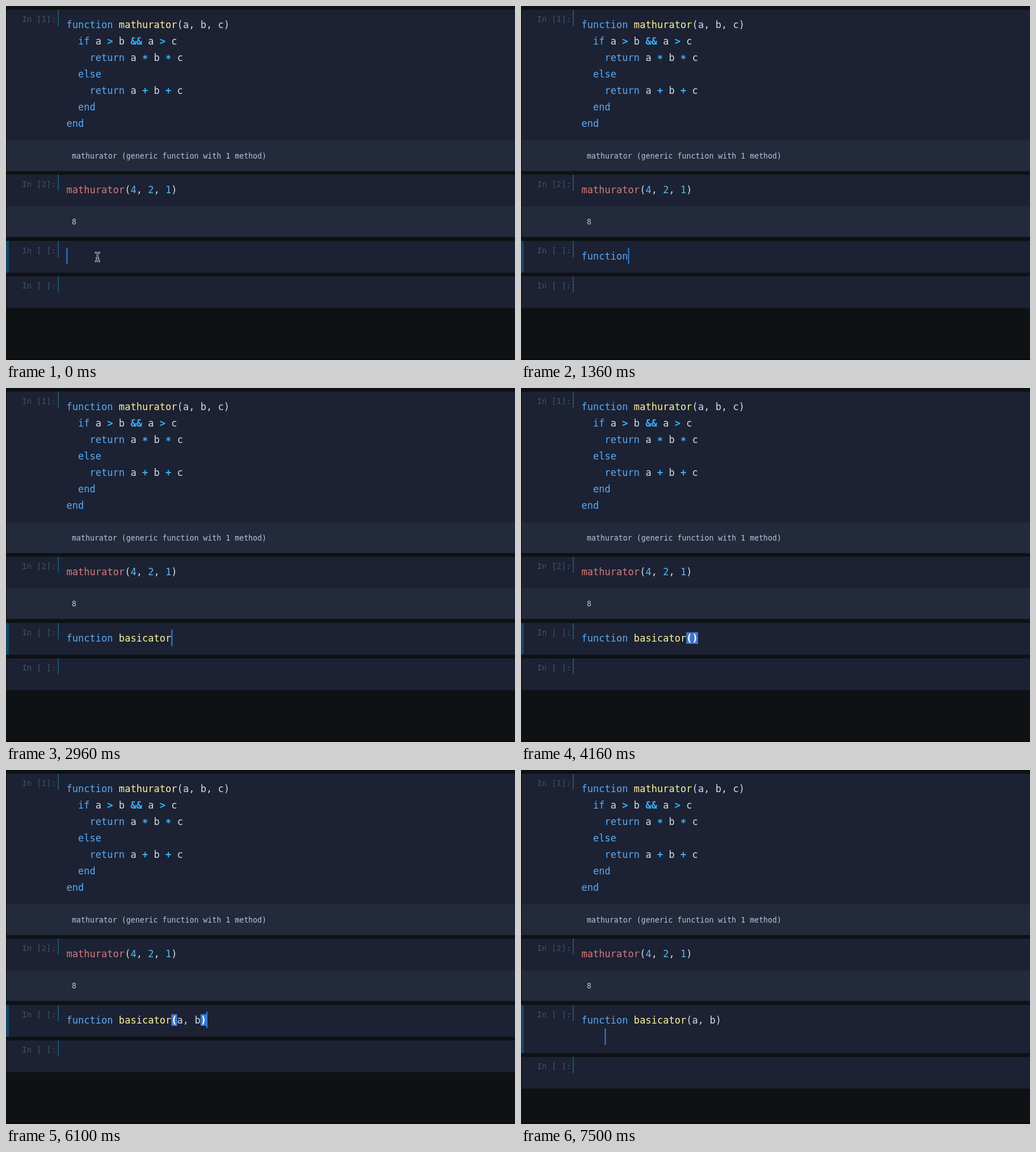
An HTML page for the animation above (8000 ms loop, 897 by 624 pixels).

```html
<!DOCTYPE html>
<html lang="en">
<head>
<meta charset="utf-8">
<title>Notebook typing</title>
<style>
html, body { margin: 0; width: 100%; height: 100%; overflow: hidden; background: #0e1214; }
svg { display: block; width: 897px; height: 624px; }
text { font-family: "DejaVu Sans Mono", monospace; white-space: pre; fill: #d2d9e6; }
.code { font-size: 17.07px; }
.out { font-size: 13.25px; fill: #b9c4e0; }
.prompt { font-size: 14.25px; fill: #435268; }
.kw { fill: #5aaaf7; }
.def { fill: #fbf399; }
.call { fill: #d57a7c; }
.num { fill: #5cb6ec; }
.op { fill: #3eaefb; font-weight: bold; }
.match { fill: #fff; font-weight: bold; }
</style>
</head>
<body>
<svg id="stage" viewBox="0 0 897 624"></svg>
<script>
const LOOP = 8000, COL = 10.277, LINE = 29.1, LEFT = 106.4, TOP = 426;
const stage = document.getElementById("stage");

function add(name, attrs, parent = stage) {
  const el = document.createElementNS("http://www.w3.org/2000/svg", name);
  for (const k in attrs) el.setAttribute(k, attrs[k]);
  return parent.appendChild(el);
}
const rect = (x, y, width, height, fill, parent) =>
  add("rect", { x, y, width, height, fill }, parent);

function label(cls, x, y, str, parent) {
  const el = add("text", { class: cls, x, y }, parent);
  el.textContent = str;
  return el;
}

const KINDS = ["kw", "def", "num", "op", "call", "paren"];
const TOKEN = /(\b(?:function|if|return|else|end)\b)|((?<=function )\w+)|(\d+)|([*+>&]+)|(\w+(?=\())|([()])/g;

// Syntax colouring; the asterisk sits lower, level with the other operators.
function paint(el, src, matched) {
  const html = src.replace(/&/g, "\u0001").replace(/>/g, "\u0002");
  const raw = s => s.replace(/\u0001/g, "&amp;").replace(/\u0002/g, "&gt;");
  let last = 0, res = "";
  for (const m of src.matchAll(TOKEN)) {
    let kind = KINDS[m.slice(1).findIndex(g => g !== undefined)];
    if (kind === "paren") kind = matched ? "match" : "";
    res += html.slice(last, m.index);
    last = m.index + m[0].length;
    const body = html.slice(m.index, last);
    res += m[0] === "*"
      ? `<tspan class="op" dy="2.5">*</tspan><tspan dy="-2.5">${html[last++] || ""}</tspan>`
      : `<tspan class="${kind}">${body}</tspan>`;
  }
  el.innerHTML = raw(res + html.slice(last));
}

function code(y, src, parent) {
  const el = add("text", { class: "code", x: LEFT, y }, parent);
  paint(el, src);
  return el;
}

function cell(y, h, n, parent) {
  const box = rect(1, y, 896, h, "#1c2233", parent);
  rect(91.2, y, 1.8, 28.6, "#1c587a", parent);
  label("prompt", 28.2, y + 21.6, `In [${n}]:`, parent);
  return box;
}

function output(y, str) {
  rect(1, y, 896, 54.3, "#232a3b");
  label("out", 116, y + 32, str);
}

rect(0, 0, 897, 624, "#0e1214");
cell(6.5, 230.5, 1);
["function mathurator(a, b, c)", "  if a > b && a > c", "    return a * b * c",
 "  else", "    return a + b + c", "  end", "end"]
  .forEach((s, i) => code(38.7 + i * LINE, s));
output(236.7, "mathurator (generic function with 1 method)");
cell(297.3, 55.7, 2);
code(330, "mathurator(4, 2, 1)");
output(352.8, "8");

const active = cell(414.2, 55.8, " ");
const bar = rect(0, 414.2, 5, 55.8, "#15465f");
const next = add("g", {});
cell(476.7, 55.8, " ", next);
rect(0, 0, 0.8, 414, "#090c0f");
rect(0, 622.4, 897, 1.6, "#07090b");

const marks = [0, 1].map(() => rect(0, 430.5, COL, 20.5, "#4078d4"));
const typed = code(446.5, "");
const caret = rect(LEFT, TOP, 2, 29, "#2f80e2");
const mouse = add("g", { fill: "none", "stroke-linecap": "square" });
const beam = "M-3 -7.5Q0 -7.5 0 -5V5Q0 7.5 -3 7.5M3 -7.5Q0 -7.5 0 -5M0 5Q0 7.5 3 7.5M-1.5 2.5H1.5";
add("path", { d: beam, stroke: "#c3c7cc", "stroke-width": 3 }, mouse);
add("path", { d: beam, stroke: "#15181f", "stroke-width": 1.1 }, mouse);

const TEXT = "function basicator(a, b)";
const OPEN = TEXT.indexOf("(");
const KEYS = [560, 700, 800, 900, 1060, 1160, 1260, 1360, 1500, 1860, 2030, 2100, 2300,
  2500, 2530, 2730, 2850, 2960, 3660, 4760, 4960, 5100, 5300, 6100, 6430];
const DARK = [[260, 560], [3500, 3660], [4160, 4700], [5860, 6100], [6960, 7500]];
let shown = -1;

function layout(n) {
  const enter = n > TEXT.length;
  const open = n > OPEN;
  const str = TEXT.slice(0, n) + (open && n < TEXT.length ? ")" : "");
  const matched = open && !enter;
  paint(typed, str, matched);
  [OPEN, str.length - 1].forEach((c, i) => {
    marks[i].setAttribute("x", LEFT + c * COL);
    marks[i].setAttribute("visibility", matched ? "visible" : "hidden");
  });
  caret.setAttribute("x", LEFT + (enter ? 4 : n) * COL);
  caret.setAttribute("y", TOP + (enter ? LINE + 0.4 : 0));
  const grow = enter ? LINE : 0;
  active.setAttribute("height", 55.8 + grow);
  bar.setAttribute("height", 55.8 + grow);
  next.setAttribute("transform", `translate(0 ${grow})`);
}

function draw(t) {
  const n = KEYS.filter(k => k <= t).length;
  if (n !== shown) layout(shown = n);
  const dark = DARK.some(([a, b]) => t >= a && t < b);
  caret.setAttribute("visibility", dark ? "hidden" : "visible");
  const step = [30, 65, 100].filter(k => k <= t).length / 3;
  const p = 1 - (1 - step) ** 1.6;
  mouse.setAttribute("transform", `translate(${161.3 + 75 * p} ${442.3 - 14 * p})`);
  mouse.setAttribute("visibility", t < 500 ? "visible" : "hidden");
}

const start = performance.now();
function tick() {
  draw((performance.now() - start) % LOOP);
  requestAnimationFrame(tick);
}
tick();
</script>
</body>
</html>
```
